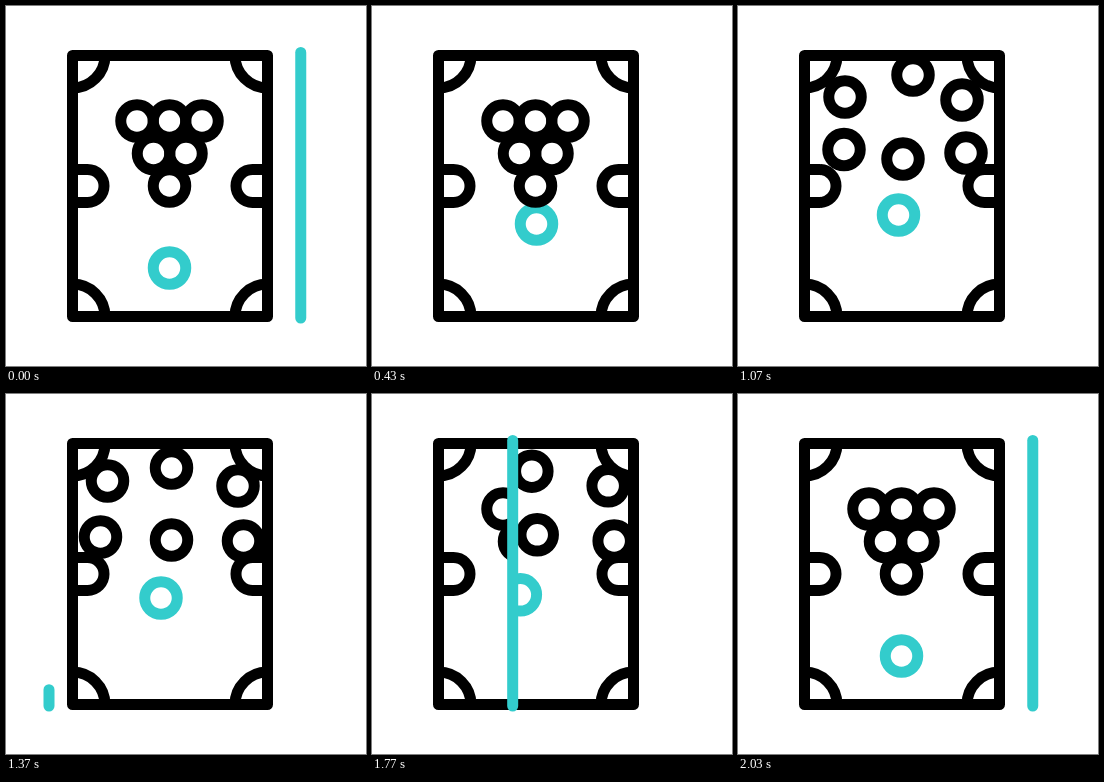
An HTML page that plays this animation: 360 by 360 pixels, repeating every 2070 ms.

```html
<!DOCTYPE html>
<html lang="en">
<head>
<meta charset="utf-8">
<title>Billiards</title>
<style>
  html, body { margin: 0; width: 100%; height: 100%; overflow: hidden; background: #fff; }
  svg { display: block; width: 100%; height: 100%; }
</style>
</head>
<body>
<svg viewBox="0 0 360 360" fill="none" stroke="#000" stroke-width="11" stroke-linejoin="round">
  <defs>
    <clipPath id="leftClip"><rect id="leftArea" width="0" height="360"/></clipPath>
    <clipPath id="rightClip"><rect id="rightArea" width="360" height="360"/></clipPath>
  </defs>
  <rect x="66.5" y="49.5" width="195" height="261"/>
  <path d="M99 49.5A32.5 32.5 0 0 1 66.5 82M229 49.5A32.5 32.5 0 0 0 261.5 82
           M99 310.5A32.5 32.5 0 0 0 66.5 278M229 310.5A32.5 32.5 0 0 1 261.5 278"/>
  <path d="M66.5 163.5H81.5a16.5 16.5 0 0 1 0 33H66.5M261.5 163.5H246.5a16.5 16.5 0 0 0 0 33H261.5"/>
  <g id="racked" clip-path="url(#leftClip)"/>
  <g id="played" clip-path="url(#rightClip)"/>
  <line id="stick" stroke="#33cccc" stroke-linecap="round"/>
</svg>
<script>
const LOOP = 2070, TEAL = '#33cccc';
const HIT = 430, DRAW = 1333, SWEEP = 1578, DONE = 2030;
const STICK = { left: 43, right: 294.75, top: 46.5, bottom: 312, gone: 240 };
const TIMES = [HIT, 770, 1070, 1370, 1800];
const CUE_HOME = [163.5, 262];

// Positions at TIMES; a ball with a bounce point is given unfolded and mirrored there.
const balls = [
  { color: TEAL, x: [164.5, 163, 160.5, 155, 148.3], y: [218, 213, 209, 204, 200.8] },
  { x: [131, 118, 107, 101.5, 98], y: [115, 102, 91, 87, 85] },
  { x: [163.5, 172, 175, 184.5, 190.2], y: [115, 90, 69, 64, 60.8], bounce: [175, 69] },
  { x: [196, 211, 224, 232, 236.2], y: [115, 103, 94, 92, 91.8] },
  { x: [147.5, 126, 106, 94.5, 89], y: [147.5, 145, 143.5, 143, 143] },
  { x: [180, 206, 228, 237.5, 242.2], y: [147.5, 147, 147, 147, 147] },
  { x: [163.5, 164.5, 165, 165.5, 165.2], y: [180, 166, 153, 146, 140.8] }
];

const byId = id => document.getElementById(id);
const setAttrs = (el, attrs) => { for (const k in attrs) el.setAttribute(k, attrs[k]); };
const lerp = (a, b, p) => a + (b - a) * p;
const progress = (t, from, to) => Math.min(1, Math.max(0, (t - from) / (to - from)));
const ease = p => p * p * (3 - 2 * p);

function addBall(parent, color, x, y) {
  const ring = document.createElementNS('http://www.w3.org/2000/svg', 'circle');
  setAttrs(ring, { r: 16.25, stroke: color || '#000', cx: x, cy: y });
  return parent.appendChild(ring);
}

// Cubic Hermite curve through the keys, coming to rest at the last one.
function spline(values, t) {
  const last = TIMES.length - 1;
  t = Math.min(Math.max(t, TIMES[0]), TIMES[last]);
  let i = 0;
  while (i < last - 1 && t > TIMES[i + 1]) i++;
  const slope = k => {
    if (k === last) return 0;
    const a = Math.max(0, k - 1);
    return (values[k + 1] - values[a]) / (TIMES[k + 1] - TIMES[a]);
  };
  const span = TIMES[i + 1] - TIMES[i], p = (t - TIMES[i]) / span, q = 1 - p;
  return lerp(values[i], values[i + 1], ease(p))
    + span * p * q * (q * slope(i) - p * slope(i + 1));
}

function position(ball, t) {
  if (ball.color && t < HIT) {
    const p = ease(progress(t, 0, HIT));
    return [lerp(CUE_HOME[0], ball.x[0], p), lerp(CUE_HOME[1], ball.y[0], p)];
  }
  const x = spline(ball.x, t), y = spline(ball.y, t);
  if (!ball.bounce) return [x, y];
  const [bx, by] = ball.bounce;
  return [bx - Math.abs(x - bx), by + Math.abs(y - by)];
}

for (const ball of balls) {
  const home = ball.color ? CUE_HOME : [ball.x[0], ball.y[0]];
  addBall(byId('racked'), ball.color, ...home);
  ball.ring = addBall(byId('played'), ball.color, ...home);
}

function render(t) {
  for (const ball of balls) {
    const [cx, cy] = position(ball, t);
    setAttrs(ball.ring, { cx, cy });
  }
  const wipe = lerp(STICK.left, STICK.right, ease(progress(t, SWEEP, DONE)));
  setAttrs(byId('leftArea'), { width: wipe });
  setAttrs(byId('rightArea'), { x: wipe });

  const leaving = t < DRAW;
  const x = leaving ? STICK.right : wipe;
  const drawn = ease(progress(t, DRAW, SWEEP));
  const erased = ease(progress(t, 0, STICK.gone));
  setAttrs(byId('stick'), {
    x1: x, x2: x,
    y1: leaving ? STICK.top : lerp(STICK.bottom, STICK.top, drawn),
    y2: leaving ? lerp(STICK.bottom, STICK.top, erased) : STICK.bottom,
    visibility: t >= STICK.gone && t <= DRAW ? 'hidden' : 'visible'
  });
}

let start;
function tick(now) {
  start ??= now;
  render((now - start) % LOOP);
  requestAnimationFrame(tick);
}
render(0);
requestAnimationFrame(tick);
</script>
</body>
</html>
```
